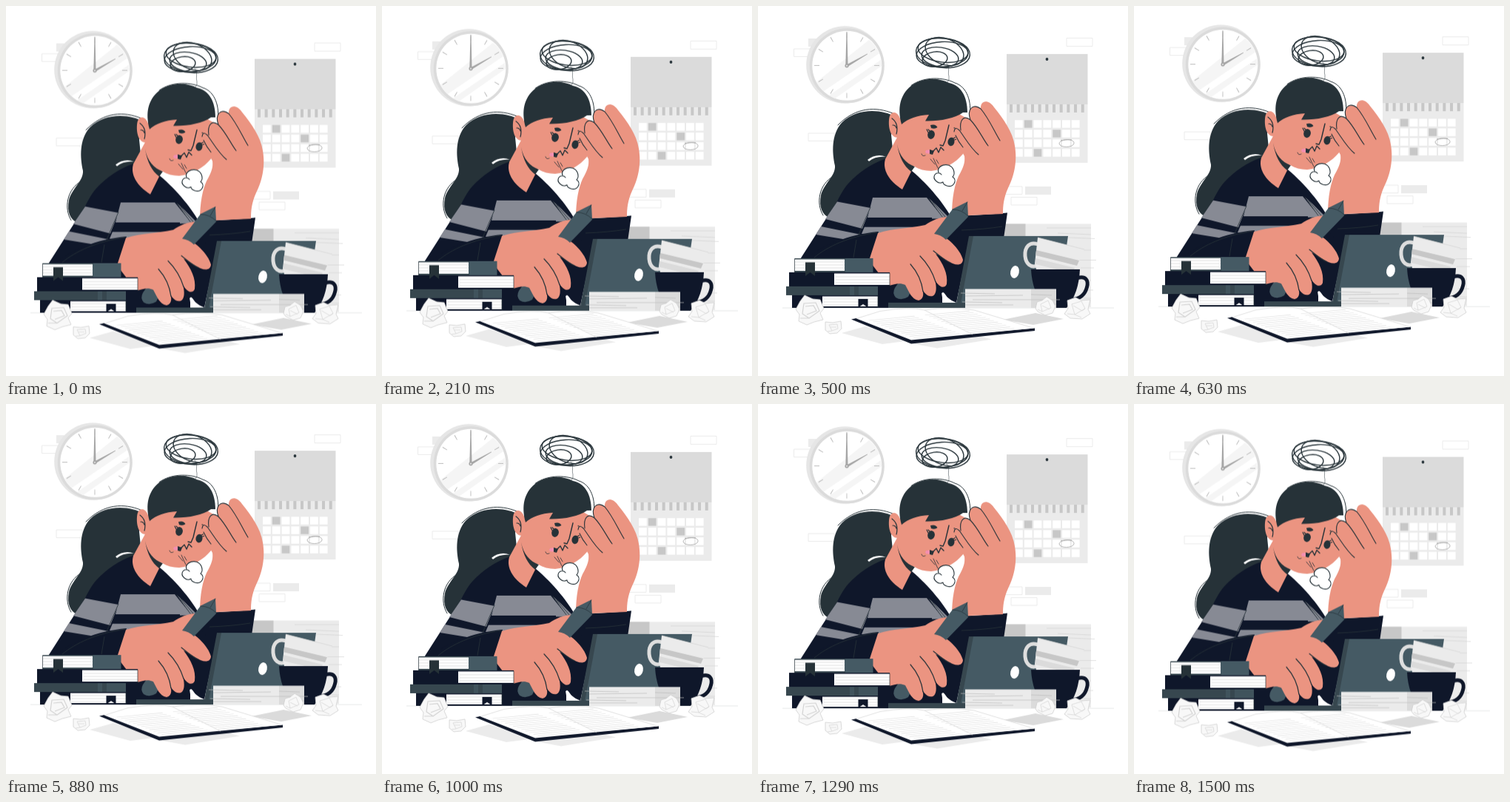
Animation of 500 by 500 pixels, one loop 1540 ms. Source, as an HTML page:

```html
<!DOCTYPE html>
<html lang="en">
<head>
<meta charset="utf-8">
<title>Tired at the desk</title>
<style>
html, body { margin: 0; width: 100%; height: 100%; overflow: hidden; background: #fff; }
svg { display: block; width: 100%; height: 100%; }
#scene { animation: float 1540ms infinite; }
/* 18 steps up, 18 steps down, then a short hold */
@keyframes float {
  0% { transform: translateY(0); animation-timing-function: steps(18); }
  48.7% { transform: translateY(-10px); animation-timing-function: steps(18); }
  97.4%, 100% { transform: translateY(0); }
}
.ink { fill: #263238; }
.navy { fill: #0f172a; }
.slate { fill: #455a64; }
.deep { fill: #37474f; }
.skin { fill: #eb9481; }
.stripe { fill: #878a94; }
.pale { fill: #ebebeb; }
.mid { fill: #dbdbdb; }
.grey { fill: #c7c7c7; }
.white { fill: #fff; }
.line { fill: none; stroke: #263238; stroke-linecap: round; stroke-linejoin: round; }
.soft { fill: none; stroke: #d4d4d4; stroke-width: .7; }
.frame { fill: none; stroke: #e6e6e6; stroke-width: .8; }
.ball { fill: #f8f8f8; stroke: #d0d0d0; stroke-width: .8; stroke-linejoin: round; }
</style>
</head>
<body>
<svg viewBox="0 -.5 500 500">
<g id="scene">

<g id="wall">
  <path class="pale" d="M68 50h16v11h-16zM361 250h35v11h-35z"/>
  <path class="frame" d="M48.5 64h24v10.500h-24zM417 49.500h35v11h-35zM68 178h35v10.500h-35zM322 250h35v10.500h-35zM342 264.500h35v10.500h-35z"/>
</g>

<g id="clock">
  <circle cx="117.500" cy="85.500" r="52.300" fill="#e6e6e6"/>
  <circle cx="120.300" cy="86.800" r="50.500" class="mid"/>
  <circle cx="120.300" cy="86.800" r="47" class="white"/>
  <path fill="#f5f5f5" d="M79 109L150 52Q159 59 164 70L89 121Q82 115 79 109zM96 127L166 79L167 87L104 131z"/>
  <circle cx="120" cy="86.500" r="40.500" fill="none" stroke="#bdbdbd" stroke-width="7" pathLength="120" stroke-dasharray=".45 9.55" stroke-dashoffset=".22"/>
  <path fill="#a6a6a6" d="M118.300 87L119.500 41H120.500L121.500 87zM118.500 86L147.800 70.500L148 71.300L120.500 88.500z"/>
  <circle cx="120" cy="86.800" r="2.600" fill="#a6a6a6"/>
  <circle cx="120" cy="86.800" r="1" class="pale"/>
</g>

<g id="calendar">
  <path class="pale" d="M336 139h109.500v79h-109.500z"/>
  <path class="mid" d="M336 71h109.500v68h-109.500z"/>
  <path stroke="#c7c7c7" stroke-width="11" stroke-dasharray="4 5.670" d="M340 144.500H442"/>
  <path stroke="#fff" stroke-width="10.500" stroke-dasharray="10.800 2" d="M347 165.500H435M347 178.500H435M347 191.500H435M347 204.500H435"/>
  <path class="grey" d="M359.800 160.200h10.800v10.500h-10.800zM398.200 173.200h10.800v10.500h-10.800zM372.600 199.200h10.800v10.500h-10.800z"/>
  <path fill="none" stroke="#a6a6a6" stroke-width=".8" d="M409 188C418 185 428 187 427 192C425 198 408 198 407 192C407 188 416 186 424 187"/>
  <circle cx="390.500" cy="78" r="1.900" class="ink"/>
</g>

<g id="scribble" class="line" stroke-width="1.400">
  <ellipse cx="250" cy="69.500" rx="36.500" ry="20" transform="rotate(5 250 69.500)"/>
  <ellipse cx="250" cy="66" rx="34" ry="16" transform="rotate(7 250 66)"/>
  <ellipse cx="249" cy="71.500" rx="35" ry="17" transform="rotate(-3 249 71.500)"/>
  <ellipse cx="252" cy="67.500" rx="27" ry="17.500" transform="rotate(22 252 67.500)"/>
  <ellipse cx="246" cy="75" rx="25" ry="13" transform="rotate(8 246 75)"/>
  <ellipse cx="239" cy="78" rx="17" ry="10" transform="rotate(-8 239 78)"/>
  <path stroke-width=".5" d="M255 84C260 90 256 96 258 101Q259 106 256 109"/>
</g>

<g id="pile">
  <path class="pale" d="M332 300.500h118V413H332z"/>
  <path class="grey" d="M332 300.500h29.500V340H332z"/>
  <path class="soft" d="M390 306h60M405 313l45 2M420 319l35 1.500M425 336h25M432 349.500h25M436 360h18M440 377h10M438 390h15M440 401h10"/>
</g>
<path stroke="#9aa0a3" stroke-width=".25" d="M33 414.100H481"/>

<g id="ponytail">
  <path class="ink" d="M186 156C168 145 133 143 113 164C99 180 100 204 104 222C105 236 89 246 85 262C82 278 87 288 96 292L140 262L172 216L182 200L180 180z"/>
  <path class="line" stroke-width="1" d="M182 151C160 142 132 142 108 167M102 236C82 247 78 273 88 289"/>
  <path class="white" d="M148 214C155 208 165 206 173 210C164 209 156 211 150 216z"/>
</g>

<g id="body">
  <path class="navy" d="M171 213C152 220 136 231 122 246C115 254 110 264 107 270L56.500 349V390H158V414H249V394Q250 390 257 402L268 407L287 317L262 293C253 276 232 249 208 229z"/>
  <path class="white" d="M248 393.500L264.500 406.500H250z"/>
  <path class="navy" d="M247 292C270 289 305 289 337 285.500L332 320H270z"/>
  <path class="stripe" d="M155 265H228L249 291V304.500H240V314H140L144 304.500H235V292H148zM107 270.500L152 279L141 307L91 294zM85 304L139 315L133 324L78 315z"/>
  <path class="navy" d="M147 293.500H250V304.500H142z"/>
  <path class="stripe" d="M231 266L241 275L257 291L249 292z"/>
  <path class="line" stroke-width=".8" d="M231 266L249 291M236 271L253 291M152 278L133 322"/>
  <path class="navy" d="M62 350C88 329 121 315 163 311L152 350z"/>
  <path fill="none" stroke="#263238" stroke-width=".9" d="M76 346C94 331 122 318 161 312M133 322L129 346M275 309Q305 308 330 304"/>
</g>

<g id="head">
  <path class="skin" d="M190 180L172 213C168 227 176 242 195 254L210 224V200z"/>
  <path class="ink" d="M188 193C191 209 200 219 212 223L207 230C197 222 191 211 188 193z"/>
  <path class="skin" d="M192 158C188 147 178 147 177 160C176 173 180 184 189 184C188 191 190 199 194 206C203 220 217 229 234 229C252 227 267 218 277 206L286 160L232 130z"/>
  <path class="line" stroke-width="1.200" d="M181 158C188 163 189 171 187 179M182 167Q186 167 187 171"/>
  <path class="ink" d="M194 166C188 144 192 126 207 114C223 102 245 103 258 110C274 113 283 128 283 150L277 150C266 158 245 162 226 161.500L231 153C215 154 203 158 194 166z"/>
  <path class="line" stroke-width="1" d="M207 113.500C224 101 251 102 266 110C283 115 289 137 286 154"/>
  <ellipse cx="234" cy="180" rx="4.800" ry="6" class="ink" transform="rotate(12 234 180)"/>
  <ellipse cx="261" cy="189.500" rx="4.500" ry="5.800" class="ink" transform="rotate(12 261 189.500)"/>
  <path class="ink" d="M233 167Q240 165 242.500 170Q239 173 234 171zM264.500 170Q270 171 270 176Q265 176 264.500 170z"/>
  <path class="line" stroke-width="1.200" d="M230 177L228 173M232 175L230 173M264 185L268 183M265 187L269 186"/>
  <ellipse cx="230" cy="203" rx="3.800" ry="2.600" fill="#f48fb1"/>
  <path class="ink" d="M232 200L238 202L236 207L232 206z"/>
  <path class="line" stroke-width="1.400" d="M258 167L253 188L250 195L246 194M236 203L241 198L244 204L247 197L251 201"/>
  <path class="line" stroke-width=".8" d="M221 206Q222 210 226 208M233 213L239 220M237 212L243 225M241 214L244 219"/>
</g>

<path id="puff" class="line" style="fill:#fff" stroke-width="1.100" d="M244 231C240 222 258 215 264 227C266 232 265 235 263 237C270 242 264 252 255 249C252 248 250 246 250 244C244 248 235 240 239 234C241 231 246 231 248 234"/>

<g id="raised-hand">
  <path class="skin" d="M262 290C262 264 266 247 271 236C278 224 280 217 279 209C274 199 267 186 265 178C263 169 269 168 274 174C272 160 278 153 287 160C282 146 290 137 301 145C300 134 311 131 319 143C332 159 344 176 347 195C351 218 345 238 338 252C332 265 331 276 331 287z"/>
  <path class="line" stroke-width="1.100" d="M265 176Q266 168 272 174C279 183 287 198 298 207M274 174C272 160 278 153 287 160C297 170 304 186 311 195M287 160C282 146 290 137 301 145C312 158 319 175 327 188M267 181Q271 190 277 197"/>
</g>

<g id="laptop">
  <path class="deep" d="M285 317H405L400 413.500H267z"/>
  <path class="slate" d="M291 317H419L405 413.500H273z"/>
  <path class="deep" d="M176 407H280V414H176z"/>
  <ellipse cx="347" cy="365.500" rx="5.800" ry="8.500" class="white" transform="rotate(12 347 365.500)"/>
</g>

<g id="writing-hand">
  <path class="slate" d="M192 377L208 389L203 399Q194 405 186 400Q181 394 185 387z"/>
  <path class="skin" d="M162 313C183 306 206 307 226 302C235 296 245 291 257 291L242 312C256 319 273 334 277 349C276 358 266 357 255 350C248 345 243 342 240 341C250 354 257 368 255 382C252 389 244 386 239 376C242 387 241 396 236 398C228 400 222 391 219 382C225 393 225 402 217 404C207 402 204 392 199 383C190 379 185 383 176 384L150 350z"/>
  <path class="line" stroke-width="1.200" d="M219 344C229 354 236 366 240 379M206 355C214 364 221 377 223 392M237 337C246 344 252 350 260 353"/>
  <path class="slate" d="M283 270.500L263 280.500L238 314Q247 315 254 322L284 291z"/>
  <path class="line" stroke-width=".7" d="M263 281Q275 281 284 290M283 271L276 283"/>
</g>

<g id="cups">
  <path class="navy" d="M369 362H435C434 384 428 401 417 414H388C376 400 370 382 369 362z"/>
  <path fill="none" stroke="#0f172a" stroke-width="5" d="M431 374C443 370 447 377 444.500 386C442 396 436 402 424 402.500"/>
  <path fill="none" stroke="#dedede" stroke-width="5" d="M378 328C367 324 360 332 361 344C362 355 369 360 377 357"/>
  <path class="pale" d="M378 319L441 335L429 362H376L374 354z"/>
  <path class="grey" d="M376 336L434 350L431 357L375 343z"/>
  <path class="mid" d="M375 347L428 360L427 362H404L375 355z"/>
  <path class="soft" d="M378 319L441 335"/>
</g>

<g id="papers">
  <path class="pale" d="M280 388.500H369V414H280z"/>
  <path class="mid" d="M369 388.500H403V414H369z"/>
  <path class="soft" style="stroke:#bdbdbd" d="M274 394L320 395M280 398L358 397M290 403H369M276 406L330 407M280 410H345M369 396L397 397M369 403H408M376 409H403"/>
</g>

<g id="books">
  <path class="white" d="M50 348H118V366H50zM103 367H178V384H103zM87 398H162V413H87z"/>
  <path class="soft" d="M50 352H117M50 356H117M50 360H117M104 372H178M104 376H178M104 380H178M88 402H162M88 406H162M88 410H162"/>
  <path class="slate" d="M117 347H155.500V366H117z"/>
  <path class="deep" d="M49.500 347H118V348.500H49.500zM49.500 364H118V366H49.500zM38 385H162V397H38z"/>
  <path class="navy" d="M42 366H103V385H42zM103 366H178V367.500H103zM103 383H178V384.500H103zM46 397H87V414H46zM87 397H162V398.500H87zM87 412H162V414H87z"/>
  <path class="ink" d="M64 352.500H77V371L70.500 366L64 371z"/>
  <path class="navy" d="M135.500 402H148.500V413.500L142 409L135.500 413.500z"/>
  <path class="slate" d="M124 385H130V397H124zM136 385H162V397H136z" opacity=".65"/>
  <path class="line" stroke-width=".7" d="M49.500 348V366M178 367V384M162 398V413"/>
</g>

<g id="notebook">
  <path class="pale" d="M113 448L145 439L207 458L168 463zM207 462L242 468.500L316 456.500L290 450z"/>
  <path class="mid" d="M331 430L375 421L413 429L372 437z"/>
  <path class="navy" d="M126 429.500L133 428L207 456L374 441.500V445L207 462.500z"/>
  <path class="white" d="M133 428.500L165 418.500Q205 412 225 417Q260 412 292 417L373 441.500L207 457.500z"/>
  <path class="soft" d="M133 428.500L165 418.500Q205 412 225 417Q260 412 292 417L373 441.500M225 417Q260 435 290 450"/>
  <g transform="matrix(1 -.094 1 .39 130 430)" fill="none" stroke="#e4e4e4" stroke-dasharray="1.500 4">
    <path stroke-width="62" d="M45 5V69"/>
    <path stroke-width="60" d="M120 5V69"/>
  </g>
</g>

<g id="balls">
  <path class="ball" d="M57 405L63 397L74 402L84 403L89 415L84 421L88 430L76 433L66 437L55 432L56 423L51 416z"/>
  <path class="soft" style="stroke-width:1.200" d="M62 408L78 407L83 418L69 428L60 422zM64 412L75 411L79 418L66 423M57 428L69 428"/>
  <path class="ball" d="M91 433L101 434L112 432L113 442L107 448L97 449L91 444z"/>
  <path class="soft" d="M96 437L107 436L108 442L100 445zM98 440H106M94 446L100 445"/>
  <path class="ball" d="M377 406L384 404L390 399L398 404L402 412L398 421L388 424L378 419L375 415z"/>
  <path class="soft" d="M382 409L392 404L396 414L384 419zM384 411L394 416M378 416L384 419"/>
  <path class="ball" d="M418 404L429 400L437 404L449 403L446 416L449 422L438 429L422 428L414 422L419 415z"/>
  <path class="soft" d="M424 409L437 405L442 415L428 423zM426 411L438 418L442 415M418 422L428 423L437 427"/>
</g>

</g>
</svg>
</body>
</html>
```
